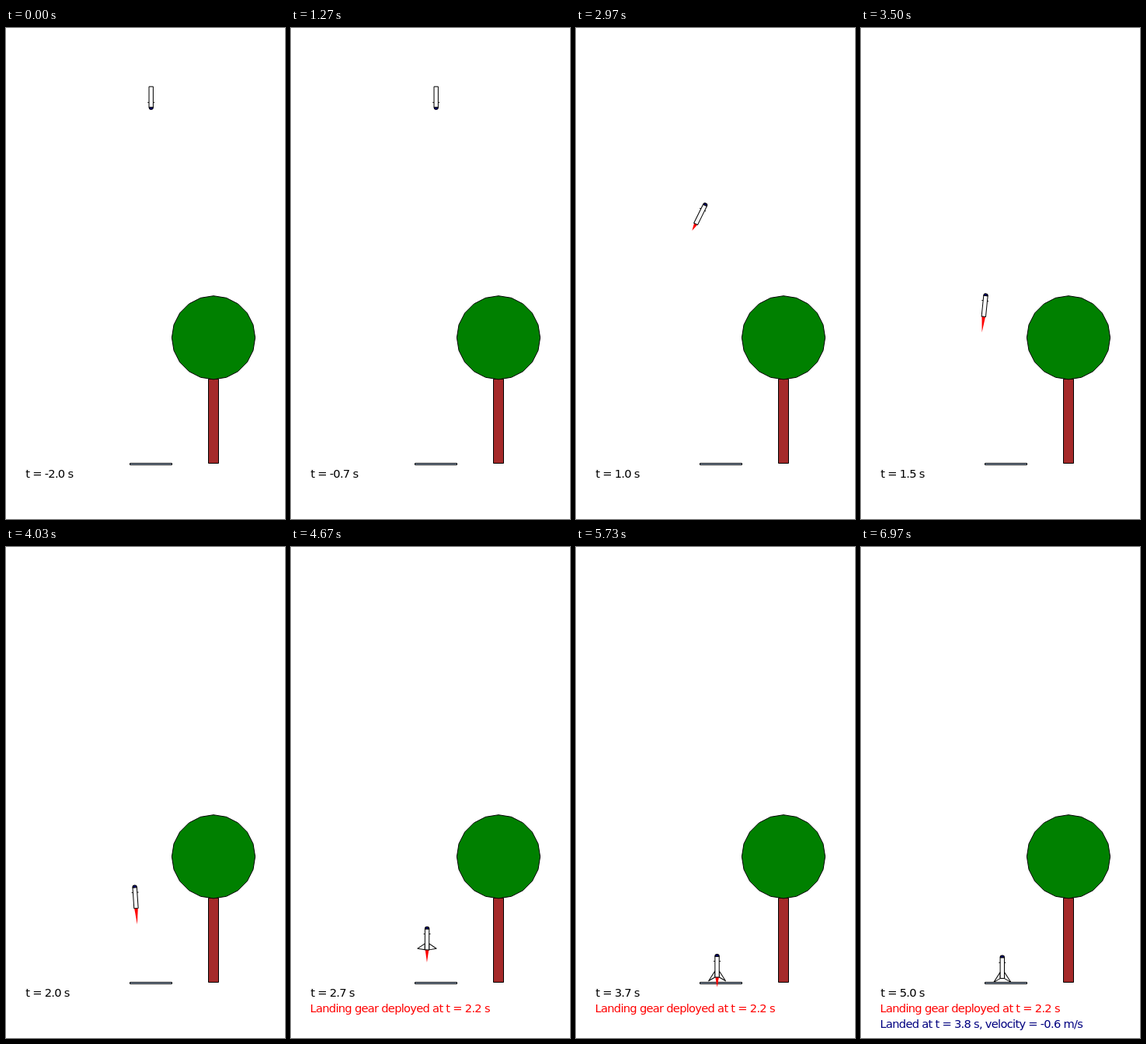
Recreate the animation shown at these times as an HTML page. Size 359 by 630 pixels, loop 7.01 s.

```html
<!DOCTYPE html>
<html lang="en">
<head>
<meta charset="utf-8">
<title>Rocket landing</title>
<style>
  html, body { margin: 0; width: 100%; height: 100%; overflow: hidden; background: #fff; }
  svg { display: block; }
  text { font: 14.67px "DejaVu Sans", sans-serif; letter-spacing: -0.72px; white-space: pre; }
  .ink { stroke: #000; stroke-width: 1; stroke-linejoin: round; }
</style>
</head>
<body>
<svg width="359" height="630" viewBox="0 0 359 630">
  <rect width="359" height="630" fill="#fff"/>
  <rect class="ink" x="260.5" y="450.5" width="13" height="108" fill="#a52a2a"/>
  <polygon class="ink" id="crown" fill="#008000"/>
  <rect class="ink" x="159.5" y="558.5" width="54" height="2" fill="#b0c4de"/>
  <g id="rocket">
    <polygon id="flame" fill="#f00"/>
    <g id="legs" class="ink" fill="#f8f8f8">
      <polygon id="legLeft"/>
      <polygon id="legRight"/>
    </g>
    <path class="ink" d="M-4.4 -20.4H4.4"/>
    <rect class="ink" x="-2.7" y="-26.8" width="5.4" height="26.8" fill="#f8f8f8"/>
    <path class="ink" d="M-2.7 -26.8A2.7 2.7 0 0 1 2.7 -26.8Z" fill="#000080"/>
  </g>
  <text id="clock" x="25.3" y="577.2"></text>
  <text id="gearNote" x="24.6" y="597.2" fill="#f00">Landing gear deployed at t = 2.2 s</text>
  <text id="landNote" x="24.6" y="617.2" fill="#000080">Landed at t = 3.8 s, velocity = -0.6 m/s</text>
</svg>
<script>
const $ = id => document.getElementById(id);
const { exp, sin, cos, min, max, floor, PI } = Math;
const LOOP = 7010, FPS = 30, LAST = 209;
const GEAR_FRAME = 126, LAND_FRAME = 175;
const timeOf = frame => frame / FPS - 2;
const GEAR_TIME = timeOf(GEAR_FRAME), TOUCHDOWN = timeOf(LAND_FRAME);
const BRAKE_TIME = 1.7;
const RAD = PI / 180;

// Swings out to the left, then eases back over the pad.
const centerX = t => 183.3 + 3.4 * exp(-5 * t) - 262 * t ** 3 * exp(-2.4 * t);

// Speeds up to a steady fall, then brakes in proportion to the height left.
const fall = t => 88.6 + 225 * (t - .31 * (1 - exp(-t / .31)));
const brake = t => 553.2 - 13 * exp(1.15 * (TOUCHDOWN - t));
const centerY = t => t < BRAKE_TIME ? fall(t) : brake(t);

// Damped spring from upside down to upright, after a short lag.
function tilt(t) {
  const s = max(0, t - .06), damping = 2, swing = 3.3;
  return -180 * exp(-damping * s) * (cos(swing * s) + damping / swing * sin(swing * s));
}

const gimbal = t => -32 * exp(-2.6 * t) * cos(13 * t);
const flameLength = t => min(22, 11 + 10 * exp(2 - t)) - 12.3 * exp(-8 * (t - 1) ** 2);

const setPoints = (id, points) => $(id).setAttribute("points", points.join(" "));
const show = (id, on) => $(id).setAttribute("visibility", on ? "visible" : "hidden");

setPoints("crown", Array.from({ length: 20 }, (_, k) =>
  [267 + 53.6 * cos(k * 18 * RAD), 397.3 + 53.6 * sin(k * 18 * RAD)]));

function drawLegs(t) {
  const open = min(1, max(0, (t - GEAR_TIME) / .7));
  const angle = (90 - 120 * open) * RAD;
  const x = 2.7 + 9.5 * cos(angle), y = -9.5 * sin(angle);
  for (const [id, side] of [["legLeft", -1], ["legRight", 1]])
    setPoints(id, [[side * 2.7, -8], [side * x, y], [side * 2.7, 0]]);
}

function drawFlame(t) {
  const angle = gimbal(t) * RAD, length = flameLength(t);
  const c = cos(angle), s = sin(angle);
  setPoints("flame", [[-2.3 * c, 2.3 * s], [length * s, length * c], [2.3 * c, -2.3 * s]]);
}

function render(ms) {
  const frame = min(LAST, floor((floor(ms / 10) + .5) * FPS / 100));
  const t = timeOf(frame);
  const flight = max(0, min(t, TOUCHDOWN));
  $("rocket").setAttribute("transform",
    `translate(${centerX(flight)} ${centerY(flight)}) rotate(${tilt(flight)}) translate(0 13.4)`);
  drawFlame(flight);
  drawLegs(t);
  show("flame", t >= 0 && frame < LAND_FRAME);
  show("legs", frame >= GEAR_FRAME);
  show("gearNote", frame >= GEAR_FRAME);
  show("landNote", frame >= LAND_FRAME);
  $("clock").textContent = `t = ${t.toFixed(1)} s`;
}

const start = performance.now();
function tick() {
  render((performance.now() - start) % LOOP);
  requestAnimationFrame(tick);
}
tick();
</script>
</body>
</html>
```
